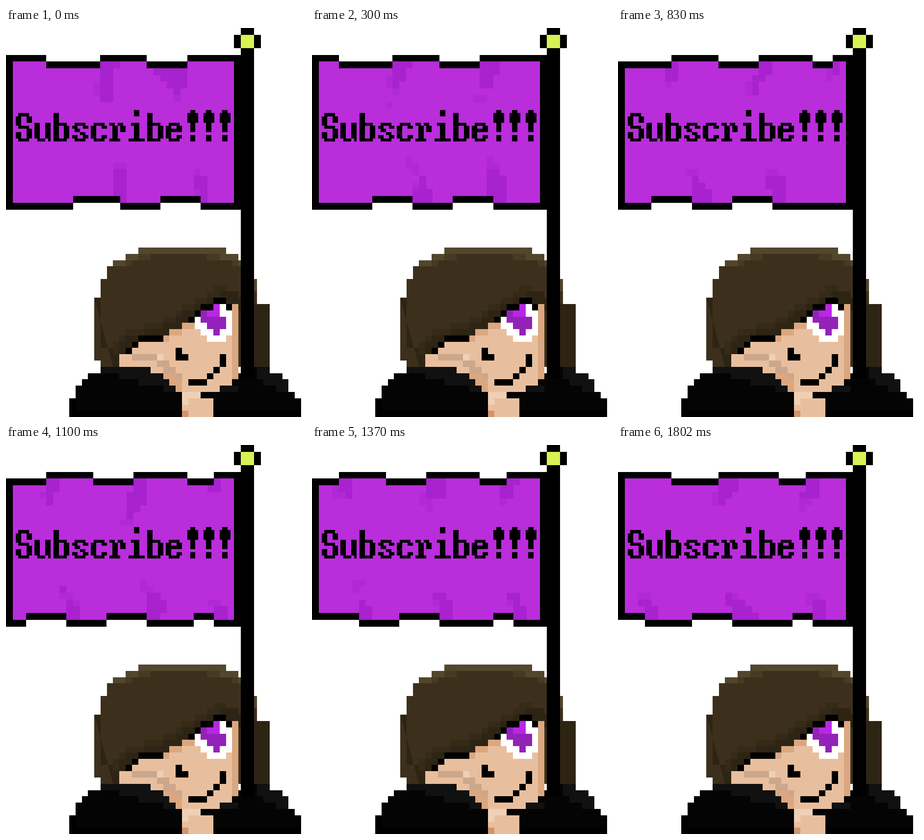
Write an HTML page that moves like this. It is 612 by 792 pixels and loops after 1.91 s.

```html
<!DOCTYPE html>
<html lang="en">
<head>
<meta charset="utf-8">
<title>Waving flag</title>
<style>
  html, body { margin: 0; width: 100%; height: 100%; overflow: hidden; background: #fff; }
  svg { display: block; width: 612px; height: 792px; }
</style>
</head>
<body>
<svg viewBox="0 0 612 792" shape-rendering="crispEdges" role="img" aria-label="Subscribe!!!">
  <g id="figure" transform="translate(129 447) scale(12.78)">
    <!-- hair -->
    <path fill="#3c301d" d="M11 0h14v1h2v1h1v3h2v4h1v10h-26v-1h-1v-10h1v-3h1v-2h1v-1h2v-1h2z"/>
    <path fill="#52462d" d="M11 0h14v1h2v1h1v1h-1v-1h-3v-1h-13v1h-2v1h-2v-1h2v-1h2zM29 5h1v2h-1z"/>
    <path fill="#463a24" d="M11 1h2v1h-2zM22 1h2v1h-2zM9 2h1v1h-1zM26 2h1v1h-1z"/>
    <path fill="#352a18" d="M23 6h2v1h2v1h-5v-1h1zM20 8h2v1h-2zM18 9h2v1h-2zM17 10h1v1h-1zM15 11h2v1h-2zM12 12h3v1h-3zM9 13h3v1h-3zM8 14h1v1h-1zM7 15h1v2h-1z"/>
    <path fill="#2e2414" d="M4 8h1v8h2v1h1v-2h1v-1h3v-1h3v-1h2v-1h1v-1h2v-1h2v-1h2v-1h3v1h1v1h4v10h-4v-9h-6v3h-2v1h-2v1h-5v2h-2v3h-3v-1h-1z"/>
    <!-- face and hand -->
    <path fill="#e8bf9e" d="M21 9h6v12h-1v1h-2v1h-3v1h2v3h-5v-4h-1v-1h-1v-1h-1v-1h-2v-1h-5v-2h2v-2h5v-1h1v-1h2v-1h2v-2h1z"/>
    <path fill="#dba780" d="M26 9h1v12h-1zM18 12h2v1h-2zM16 13h2v1h-2zM15 14h1v1h-1zM15 20h2v1h1v2h-1v-1h-1v-1h-1z"/>
    <path fill="#efd0b5" d="M14 17h1v1h1v1h1v1h-1v-1h-2zM18 23h3v1h-2v1h-1z"/>
    <path fill="#cba78b" d="M10 17h4v1h2v1h1v1h1v1h-1v-1h-2v-1h-1v-1h-4z"/>
    <path fill="#d59369" d="M18 26h1v1h-1z"/>
    <!-- eye -->
    <path fill="#fff" d="M24 9h1v1h1v4h-1v1h-3v-1h-1v-1h-1v-2h1v-1h3z"/>
    <path fill="#9322b8" d="M21 10h3v1h1v2h-1v1h-1v-1h-1v-1h-1z"/>
    <path fill="#ba25e6" d="M23 9h1v2h-2v-1h1z"/>
    <!-- lashes, fringe line, nose, smile -->
    <path d="M23 8h2v1h1v1h-1v-1h-2v1h-2v1h-1v1h-1v-1h1v-1h1v-1h2zM11 14h4v1h-4v1h-1v1h-1v-1h1v-1h1zM17 16h1v1h1v1h-2zM24 17h1v2h-1v1h-1v1h-1v1h-3v-1h3v-1h1v-1h1z"/>
    <!-- sleeves -->
    <path fill="#040404" d="M5 19h8v1h2v1h1v1h1v1h1v4h-18v-3h1v-2h1v-1h1v-1h2zM28 19h4v1h2v1h1v2h1v1h1v3h-14v-3h-2v-1h3v-1h2v-1h1v-1h1z"/>
    <path fill="#111" d="M5 19h8v1h2v1h1v1h1v1h-2v-1h-4v-1h-3v-1h-3zM30 19h2v1h2v1h1v2h-2v-1h-2v-1h-1zM24 22h3v1h-3z"/>
    <path d="M0 26h18v1h-18zM23 26h14v1h-14zM0 24h1v2h-1z"/>
  </g>
  <g id="flag" transform="scale(13.687)">
    <path d="M35 0h2v1h1v2h-1v49.2h-2v-49.2h-1v-2h1z"/>
    <path fill="#d9f154" d="M35 1h2v2h-2z"/>
    <path fill="#b92ddb" d="M1 5h33v21h-33z"/>
    <path id="soft" fill="none" stroke="#b129d5" transform="translate(0 .5)"/>
    <path id="fold" fill="#a822cf"/>
    <path id="border" fill="none" stroke="#000"/>
  </g>
  <g id="lettering" fill-rule="evenodd" transform="translate(20 167) scale(5.47 6.4)"></g>
</svg>
<script>
const $ = id => document.getElementById(id);

const glyphs = {
  S: 'M1 1h4v1h1v2h-2v-2h-2v3h3v1h1v3h-1v1h-4v-1h-1v-2h2v2h2v-3h-3v-1h-1v-3h1z',
  u: 'M0 4h2v5h2v-5h2v6h-1v-1h-1v1h-3v-1h-1z',
  b: 'M0 1h2v3h3v1h1v4h-1v1h-5zM2 5v4h2v-4z',
  s: 'M1 4h4v1h1v1h-2v-1h-2v1h1v1h2v1h1v1h-1v1h-4v-1h-1v-1h2v1h2v-1h-1v-1h-2v-1h-1v-1h1z',
  c: 'M1 4h4v1h1v1h-2v-1h-2v4h2v-1h2v1h-1v1h-4v-1h-1v-4h1z',
  r: 'M0 4h2v1h1v-1h2v1h1v2h-2v-2h-1v4h1v1h-4v-1h1v-4h-1z',
  i: 'M2 0h2v2h-2zM1 4h3v5h2v1h-6v-1h2v-4h-1z',
  e: 'M1 4h4v1h1v2h-4v2h2v-1h2v1h-1v1h-4v-1h-1v-4h1zM2 5v1h2v-1z',
  '!': 'M2 0h2v1h1v3h-1v3h-2v-3h-1v-3h1zM2 8h2v2h-2z'
};

function write(message) {
  let x = 0;
  for (const char of message) {
    const path = document.createElementNS('http://www.w3.org/2000/svg', 'path');
    path.setAttribute('d', glyphs[char]);
    path.setAttribute('transform', `translate(${x})`);
    $('lettering').append(path);
    x += char === '!' ? 6 : 7;
  }
}

// top and bottom: spans where the hem dips inward; fold and soft: shading
const poses = [
  { ms: 300, top: [[6, 14], [21, 27]], bottom: [[10, 17], [23, 29]],
    fold: 'M14 5h3v1h-1v5h-2zM22 6h5v3h-1v1h-1v-1h-1v-1h-1v-1h-1zM16 21h2v5h-2zM28 22h2v4h-1v-2h-1z',
    soft: 'M13 8h1M13 9h1M25 10h1M16 20h2M28 21h1M28 24h1' },
  { ms: 270, top: [[4, 12], [19, 25]], bottom: [[9, 15], [21, 27]],
    fold: 'M12 5h3v1h-1v2h-1v1h-1zM25 5h3v2h-1v2h-2zM16 22h1v2h1v2h-3v-2h1zM26 21h2v1h1v4h-3z',
    soft: 'M11 7h1M11 8h1M12 9h1M11 11h1M25 10h1M24 10h1M14 19h1M14 20h2M15 21h1M15 23h1M26 19h1M26 20h2' },
  { ms: 260, top: [[2, 10], [17, 23]], bottom: [[7, 13], [19, 25]],
    fold: 'M10 5h2v4h-1v1h-1v1h-1v-4h1zM23 5h2v3h-1v2h-1zM13 21h1v2h1v3h-2v-2h-1v-1h1zM25 22h2v1h1v3h-3z',
    soft: 'M11 9h1M10 10h1M8 11h2M8 12h1M22 8h1M22 9h1M22 10h2M11 19h2M12 20h1M12 21h1M12 22h1M15 24h1M24 19h1M24 20h2M24 21h2' },
  { ms: 270, top: [[0, 8], [15, 21], [29, 32]], bottom: [[5, 11], [17, 23]],
    fold: 'M8 5h1v3h-2v-2h1zM21 5h2v2h-1v1h-1v2h-1v-3h1zM32 5h1v2h-1zM11 22h1v1h1v1h1v2h-3zM22 22h3v4h-2v-2h-1z',
    soft: 'M7 8h1M19 8h1M19 9h1M31 6h1M31 7h1M10 21h2M22 21h2' },
  { ms: 270, top: [[0, 6], [13, 19], [27, 31]], bottom: [[3, 9], [15, 21], [28, 31]],
    fold: 'M6 5h2v2h-1v2h-1zM19 5h2v4h-1v1h-1v1h-1v-4h1zM31 5h1v2h-2v-1h1zM8 21h1v1h-1zM9 23h1v1h1v2h-2zM21 22h2v1h1v2h-1v1h-2zM31 24h2v2h-2z',
    soft: 'M5 7h1M17 11h2M8 22h2M10 23h1M20 20h1M20 21h2M30 23h2' },
  { ms: 270, top: [[0, 4], [11, 17], [25, 29]], bottom: [[0, 7], [13, 19], [27, 30]],
    fold: 'M4 5h2v3h-1v-1h-1zM17 5h3v3h-3zM29 5h2v1h-1v2h-2v-2h1zM7 23h1v1h1v2h-2zM18 22h2v1h1v3h-2v-3h-1zM29 22h2v2h1v2h-2v-3h-1z',
    soft: 'M3 6h1M3 7h2M16 7h1M16 8h2M17 9h1M28 8h1M6 20h2M6 21h1M18 23h1M29 23h1' },
  { ms: 270, top: [[8, 15], [24, 28]], bottom: [[0, 4], [11, 17], [26, 29]],
    fold: 'M15 5h3v2h-1v1h-1v1h-1zM28 5h2v3h-3v-1h1zM3 23h2v1h1v2h-2v-2h-1zM16 22h1v1h2v1h1v1h1v1h-4v-2h-1zM29 23h2v3h-2z',
    soft: 'M14 7h1M14 8h1M27 8h2M27 9h1M3 22h2M17 22h1M28 22h2M28 23h1' }
];
const loop = poses.reduce((sum, pose) => sum + pose.ms, 0);

function hem(dips, outer, inner) {
  let x = 0, d = '';
  for (const [from, to] of dips) {
    d += `M${x} ${outer}H${from}M${from} ${inner}H${to}`;
    x = to;
  }
  return `${d}M${x} ${outer}H35`;
}

function poseAt(time) {
  let rest = time % loop;
  return poses.find(pose => (rest -= pose.ms) < 0);
}

let shown;
function render(time) {
  const pose = poseAt(time);
  if (pose === shown) return;
  shown = pose;
  $('fold').setAttribute('d', pose.fold);
  $('soft').setAttribute('d', pose.soft);
  $('border').setAttribute('d',
    hem(pose.top, 4.5, 5.5) + hem(pose.bottom, 26.5, 25.5) + 'M.5 5V26M34.5 4V27');
}

write('Subscribe!!!');
const start = performance.now();
function tick() {
  render(performance.now() - start);
  requestAnimationFrame(tick);
}
tick();
</script>
</body>
</html>
```
